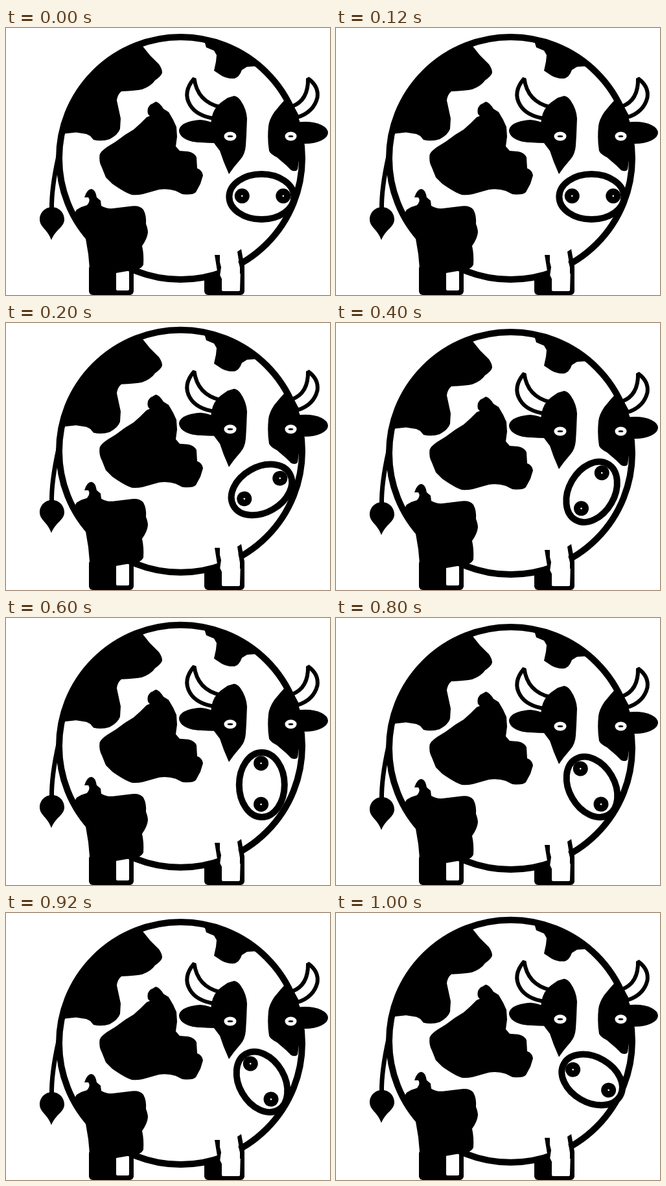
An HTML page that plays this animation: 500x413 px, repeating every 1200 ms.

```html
<!DOCTYPE html>
<html lang="en">
<head>
<meta charset="utf-8">
<title>Cow</title>
<style>
  html, body { margin: 0; width: 100%; height: 100%; overflow: hidden; background: #fff; }
  svg { display: block; width: 100%; height: 100%; }
  .line { fill: #fff; stroke: #000; stroke-linejoin: bevel; }
  .white { fill: #fff; }
</style>
</head>
<body>
<svg viewBox="0 0 500 413">
  <defs>
    <clipPath id="hide"><circle cx="269.5" cy="201.5" r="190"/></clipPath>
  </defs>

  <!-- feet stay on the ground -->
  <rect x="128" y="366" width="69" height="47" rx="6"/>
  <rect class="white" x="170" y="355" width="20" height="51" rx="2"/>
  <rect x="306" y="366" width="62" height="47" rx="6"/>

  <g id="cow">
    <!-- tail -->
    <path d="M81 198Q70 248 70.5 280" fill="none" stroke="#000" stroke-width="7"/>
    <path d="M71 277C82 277 90 286 90 296C90 308 77 311 70 328C64 311 52 308 52 296C52 286 60 277 71 277Z"/>

    <!-- right horn and ear -->
    <path class="line" stroke-width="6" d="M466 78Q483 90 480.5 107.5Q475 130 450 138L441 121.5Q467 112 466 78Z"/>
    <ellipse cx="462" cy="162" rx="35" ry="17"/>

    <circle class="line" cx="269.5" cy="201.5" r="187.5" stroke-width="10"/>

    <!-- hide patches -->
    <g clip-path="url(#hide)">
      <path d="M210 27L222 42L236 56Q241 63 241 69Q240 74 230 81Q224 90 210 95Q200 97 178 98Q172 103 171 112L174 126L177 140L176 156Q173 165 160 172Q148 176 135 173L130 167L124 164L108 161.5L90 163.5L60 163L60 10L200 10Z"/>
      <path d="M306 20L309 30L321 35L325 42L324 52L321 66L333 74Q342 79 353 78Q360 76 364 65L372 60L388 59L400 40L330 5Z"/>
      <path d="M433 108L424 118L414 130Q406 142 405 152Q403 172 406 190Q408 195 418 200L432 212L440 220Q447 223 450 219L452 205L470 200L470 120Z"/>
    </g>
    <path d="M231 114Q237 115 243 125L251 130L258 142L263 153L264 168L262 183L268 190L281 191Q291 193 294 200L295 217Q303 220 304 228L300 241L293 254Q288 259 272 257L262 252Q250 248 236 250L211 257Q202 259 194 258Q184 255 164 241L154 231L148 216Q143 207 144.5 196Q146 191 156 184L169 176L184 165L197 157L207 148L217 138L222 136Q217 133 219 124Q222 118 226 117Z"/>
    <path d="M121 262Q125 249 132 249Q138 250 140 262L146 267L147 275Q155 280 165 279L190 276Q206 273 212 281Q217 290 216 303Q219 311 219 316Q218 326 210 337Q213 350 212 366Q208 375 190 375.5L170 379L150 378L129 372L127 350L123 326L104 290L109 281L116 277L125 274Q131 267 127 262Z"/>

    <!-- left horn, ear and eye patch -->
    <path class="line" stroke-width="6" d="M290.5 78Q272 99 284 119Q294 136 322 140L331 122.5Q295 114 290.5 78Z"/>
    <path d="M267 159C268 147 285 143 300 142Q312 143 322 148L324 178Q312 178 300 177C285 177 268 171 267 159Z"/>
    <path d="M352 105L342 108L332 115Q320 124 317 140L316 150L321 178L330 190L336 207L344 226L352 215L362 203Q369 195 370 182L371 165L372 140Q371 125 362 112Q358 106 352 105Z"/>

    <!-- eyes -->
    <ellipse class="white" cx="346" cy="167.5" rx="9.5" ry="7"/>
    <ellipse cx="346" cy="167.5" rx="4.3" ry="1.5"/>
    <ellipse class="white" cx="439.5" cy="167.5" rx="9" ry="7"/>
    <ellipse cx="439.5" cy="167.5" rx="3.8" ry="1.5"/>

    <!-- front leg -->
    <path class="white" d="M330 351L357 345L358 360L362 372L361 406L333 406L333 388L330 382Z"/>
    <path d="M322 351L330 351L330 362L332 370L330 384L326 376Z"/>
  </g>

  <!-- parts of the front leg that stay on the ground -->
  <path class="white" d="M333 385H361V405Q361 407 359 407H335Q333 407 333 405Z"/>
  <path d="M357 346L363 342L368 369V380H361V371Z"/>

  <g id="snout">
    <ellipse class="line" cx="-.4" rx="50" ry="35" stroke-width="10"/>
    <g transform="translate(0 -1.2)">
      <circle cx="-30.5" r="11.5"/>
      <circle class="white" cx="-30.5" r="1.3"/>
      <circle cx="33" r="11.5"/>
      <circle class="white" cx="33" r="1.3"/>
    </g>
  </g>
</svg>
<script>
  const cow = document.getElementById('cow');
  const snout = document.getElementById('snout');

  // Six held poses: the body hops on every other one, the snout turns by 30 degrees.
  function draw(now) {
    const step = Math.floor(now / 200) % 6;
    const hop = step % 2 ? -3.3 : 0;
    cow.setAttribute('transform', `translate(0 ${hop})`);
    snout.setAttribute('transform', `translate(394.8 ${261 + hop}) rotate(${-30 * step})`);
    requestAnimationFrame(draw);
  }
  draw(performance.now());
</script>
</body>
</html>
```
